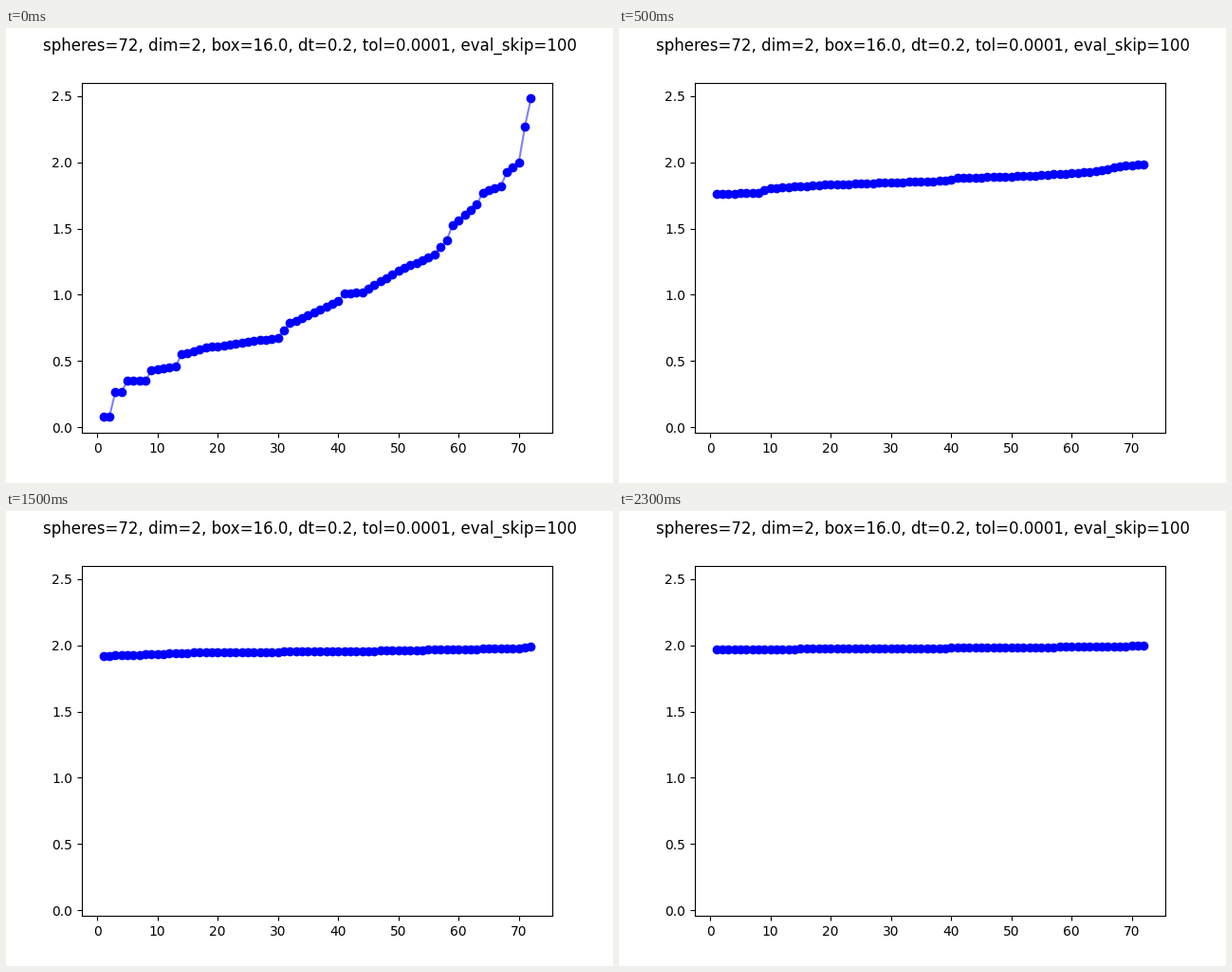
Write a matplotlib script that moves like this. It is 640 px wide and 480 px high and loops after 2500 ms.

```python
import matplotlib.pyplot as plt
import numpy as np
from matplotlib.animation import FuncAnimation

COUNT = 72
index = np.arange(1, COUNT + 1)


def ramp(*knots):
    """Rising values, straight between (index, value) knots."""
    xs, ys = zip(*knots)
    return np.interp(index, xs, ys)


# Sorted distances: scattered at first, then nearly level.
states = [
    ramp((2, 0.0775), (3, 0.265), (4, 0.265), (5, 0.35), (8, 0.35),
         (9, 0.43), (13, 0.46), (14, 0.55), (18, 0.6), (30, 0.675),
         (32, 0.785), (40, 0.955), (41, 1.01), (44, 1.02), (50, 1.18),
         (56, 1.305), (58, 1.41), (59, 1.525), (63, 1.68), (64, 1.77),
         (67, 1.82), (68, 1.925), (70, 2.0), (71, 2.27), (72, 2.481)),
    ramp((1, 1.761), (8, 1.77), (10, 1.804), (19, 1.83), (39, 1.861),
         (41, 1.88), (53, 1.898), (63, 1.926), (69, 1.975), (72, 1.985)),
    ramp((2, 1.832), (3, 1.852), (7, 1.867), (14, 1.87), (25, 1.895),
         (46, 1.913), (50, 1.924), (64, 1.934), (72, 1.961)),
    ramp((1, 1.919), (17, 1.946), (44, 1.956), (70, 1.978), (72, 1.991)),
    ramp((1, 1.9675), (14.5, 1.9724), (39.5, 1.9795), (57.5, 1.9867),
         (69.5, 1.9939), (72, 1.996)),
]

# The axes scale to the first state and then stay fixed.
fig, ax = plt.subplots(figsize=(6.4, 4.8), dpi=100)
fig.suptitle("spheres=72, dim=2, box=16.0, dt=0.2, tol=0.0001, eval_skip=100")
link, = ax.plot(index, states[0], "b-", alpha=0.5)
dots, = ax.plot(index, states[0], "bo")
ax.set_xlim(ax.get_xlim())
ax.set_ylim(ax.get_ylim())


def draw(i):
    link.set_ydata(states[i])
    dots.set_ydata(states[i])
    return link, dots


anim = FuncAnimation(fig, draw, frames=len(states), interval=500,
                     repeat=True, repeat_delay=0)
plt.show()
```
